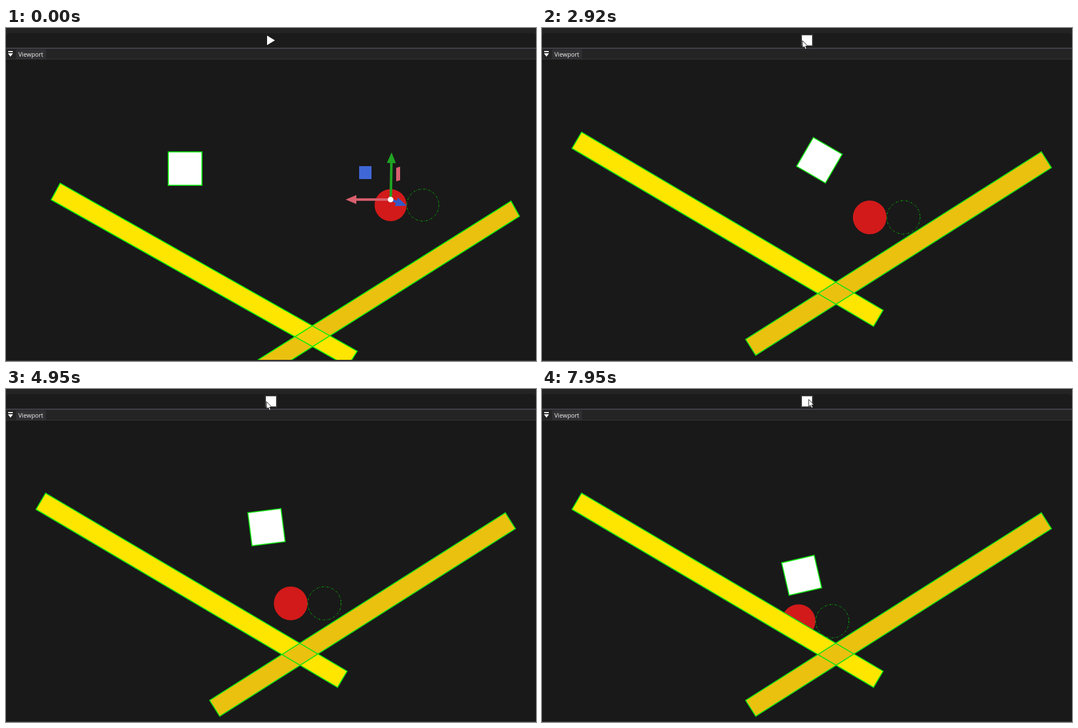
Animation of 944x593 px, one loop 8 s. Source, as an HTML page with a canvas:

```html
<!DOCTYPE html>
<html>
<head>
<meta charset="utf-8">
<style>
  html, body { margin: 0; width: 100%; height: 100%; overflow: hidden; background: #191919; }
  canvas { display: block; }
</style>
</head>
<body>
<canvas id="stage" width="944" height="593"></canvas>
<script>
const ctx = document.getElementById('stage').getContext('2d');
const LOOP = 8000, FRAME = 70, PLAY_AT = 820, DROP_AT = 872, GRAVITY = 523; // ms, px/s²
const YELLOW = '#ffe600', ORANGE = '#ebc110', RED = '#d21a1a', GREEN = '#12e212';
const PINK = '#d9606e', BLUE = '#4067d6', LIME = '#20a423', WHITE = '#fff';

const LEFT = { x: 330.5, y: 358.4, angle: 30.55 };
const RIGHT = { x: 635, y: 401.6, angle: -32.37 };
const RAMP = { length: 623.6, thickness: 33.5 };

// Ramp contacts as [time, x, angle]; heights follow from the ramps, arcs from gravity.
const BALL = {
  clearance: 35.5,
  bounces: [[388, 725], [1360, 725], [2340, 611], [2943, 645], [3786, 582], [4427, 516], [5000, 572],
    [5380, 552], [5800, 598], [6450, 573], [6970, 528], [7460, 523], [7950, 517]]
};
const BOX = {
  clearance: 45,
  bounces: [[215, 291.5, 0], [1526, 291.5, 0], [2360, 557, 267], [3805, 394.6, 585],
    [5373, 489.6, 760], [6605, 430.5, 946], [8064, 465.2, 882]]
};

const rad = degrees => degrees * Math.PI / 180;
const clamp01 = v => Math.min(1, Math.max(0, v));
const mix = (a, b, k) => a + (b - a) * k;

function rampTop(ramp, x) {
  const a = rad(ramp.angle);
  return ramp.y + (x - ramp.x) * Math.tan(a) - RAMP.thickness / 2 / Math.cos(a);
}

function bodyAt({ bounces, clearance }, time) {
  const t = Math.max(time, DROP_AT);
  const rest = x => Math.min(rampTop(LEFT, x), rampTop(RIGHT, x)) - clearance;
  const next = bounces.findIndex(b => b[0] >= t);
  const [t0, x0, spin0 = 0] = bounces[next - 1], [t1, x1, spin1 = 0] = bounces[next];
  const k = (t - t0) / (t1 - t0);
  // The first arc starts at rest from its apex, above the first contact.
  const arc = GRAVITY / 2 * (t - t0) * (t1 - t) / 1e6;
  return { x: mix(x0, x1, k), y: mix(rest(x0), rest(x1), k) - arc, angle: mix(spin0, spin1, k) };
}

function poly(points, fill, stroke, width = 1.8) {
  ctx.beginPath();
  points.forEach(([x, y]) => ctx.lineTo(x, y));
  ctx.closePath();
  if (fill) { ctx.fillStyle = fill; ctx.fill(); }
  if (stroke) { ctx.strokeStyle = stroke; ctx.lineWidth = width; ctx.stroke(); }
}

function bar({ x, y, angle }, w, h, fill, stroke) {
  const c = Math.cos(rad(angle)), s = Math.sin(rad(angle));
  const corner = (u, v) => [x + (u * w * c - v * h * s) / 2, y + (u * w * s + v * h * c) / 2];
  poly([corner(-1, -1), corner(1, -1), corner(1, 1), corner(-1, 1)], fill, stroke);
}

function rect(x, y, w, h, color) {
  ctx.fillStyle = color;
  ctx.fillRect(x, y, w, h);
}

function disc(x, y, r, color) {
  ctx.fillStyle = color;
  ctx.beginPath();
  ctx.arc(x, y, r, 0, 7);
  ctx.fill();
}

function line(x1, y1, x2, y2, color, width) {
  ctx.strokeStyle = color;
  ctx.lineWidth = width;
  ctx.beginPath();
  ctx.moveTo(x1, y1);
  ctx.lineTo(x2, y2);
  ctx.stroke();
}

function arrow(x, y, angle, length, head, color) {
  ctx.save();
  ctx.translate(x, y);
  ctx.rotate(rad(angle));
  line(5, 0, length - head + 1, 0, color, 4.5);
  poly([[length, 0], [length - head, -8], [length - head, 8]], color);
  ctx.restore();
}

function collider(x, y, r) {
  ctx.setLineDash([3, 2, 1, 3]);
  ctx.strokeStyle = '#00d800';
  ctx.lineWidth = 1;
  ctx.beginPath();
  ctx.arc(x, y, r, 0, Math.PI * 2);
  ctx.stroke();
  ctx.setLineDash([]);
}

function drawEditor() {
  const outline = '#08ee08';
  // Seen in perspective, so the ramps taper slightly.
  const left = [[96.5, 276.5], [625.5, 575.5], [608.5, 602.5], [80.5, 305.8]];
  const right = [[899.5, 308.3], [914.5, 335.3], [455.5, 624.5], [400.5, 621.3]];
  poly(right, ORANGE);
  poly(left, YELLOW);

  // Both ramps share a depth, so their overlap breaks into fine stripes.
  ctx.save();
  poly(left);
  ctx.clip();
  poly(right, '#f6d30a');
  ctx.clip();
  for (let x = 490; x < 600; x += 6) line(x, 528, x + 44, 570, '#efc80e', 1.2);
  ctx.restore();
  poly(left, null, outline);
  poly(right, null, outline);
  bar({ x: 319, y: 250.3, angle: 0 }, 60, 59.5, WHITE, outline);

  disc(685, 315.5, 28.5, RED);
  collider(742.5, 315.3, 28.5);
  arrow(685.3, 305.5, -89, 84, 19, LIME);
  arrow(685, 305.5, 180, 80, 19, PINK);
  arrow(685, 305.5, 21, 31, 20, '#345ac8');
  disc(685, 305.5, 5, WHITE);
  rect(629, 246, 22, 23, BLUE);
  poly([[695, 249], [702, 247], [702, 271], [695, 273]], PINK);
}

function drawGame(time) {
  const ball = bodyAt(BALL, time), box = bodyAt(BOX, time);
  const { length, thickness } = RAMP;
  disc(ball.x - 60, ball.y, 30, RED);
  bar(LEFT, length, thickness, YELLOW);
  bar(RIGHT, length, thickness, ORANGE);
  bar(LEFT, length, thickness, null, GREEN);
  bar(RIGHT, length, thickness, null, GREEN);
  bar(box, 59.4, 59.4, WHITE, GREEN);
  collider(ball.x, ball.y, 29.7);
}

function drawChrome(time) {
  rect(0, 0, 944, 36, '#242424');
  ctx.fillStyle = '#1b1b1c';
  ctx.beginPath();
  ctx.roundRect(0, 9, 944, 27, [6, 6, 0, 0]);
  ctx.fill();
  rect(0, 35, 944, 2, '#45434d');
  rect(0, 37, 944, 18, '#242424');
  rect(0, 55, 944, 1, '#363538');
  rect(18, 38, 53, 17, '#302f32');
  rect(0, 591, 944, 1, '#1c1c1c');
  rect(0, 592, 944, 1, '#3b393f');

  rect(4, 41, 8, 2, WHITE);
  poly([[3.5, 45], [12.5, 45], [8, 51]], WHITE);
  ctx.fillStyle = '#f4f4f4';
  ctx.font = '10.7px "Open Sans", "Noto Sans", sans-serif';
  ctx.fillText('Viewport', 22, 51);

  if (time >= 680) rect(461, 11, 22, 22, '#373737');
  if (time >= PLAY_AT) rect(463, 13, 18, 18, WHITE);
  else poly([[465, 13.5], [479, 22], [465, 30.5]], WHITE);
}

function drawCursor(time) {
  if (time < FRAME) return;
  const arrive = clamp01((time - FRAME) / 340);
  const k = arrive * arrive * (3 - 2 * arrive);
  const shift = clamp01((time - 6300) / 400);
  ctx.save();
  ctx.translate(mix(883, 464, k) + 11 * shift, mix(567, 22.5, k) - 4 * shift);
  poly([[0, 0], [0, 13], [3, 10.5], [5.2, 15.5], [7.5, 14.5], [5.4, 9.8], [9.5, 9.8]], WHITE, '#111', 1);
  ctx.restore();
}

function snap(time) {
  if (time >= 410 && time < 680) return 410;
  const base = time < 410 ? 0 : time < 6480 ? 680 : 6480;
  return base + Math.floor((time - base) / FRAME) * FRAME;
}

function draw() {
  const time = snap(performance.now() % LOOP);
  rect(0, 0, 944, 593, '#191919');
  if (time < PLAY_AT) drawEditor();
  else drawGame(time);
  drawChrome(time);
  drawCursor(time);
  requestAnimationFrame(draw);
}
draw();
</script>
</body>
</html>
```
